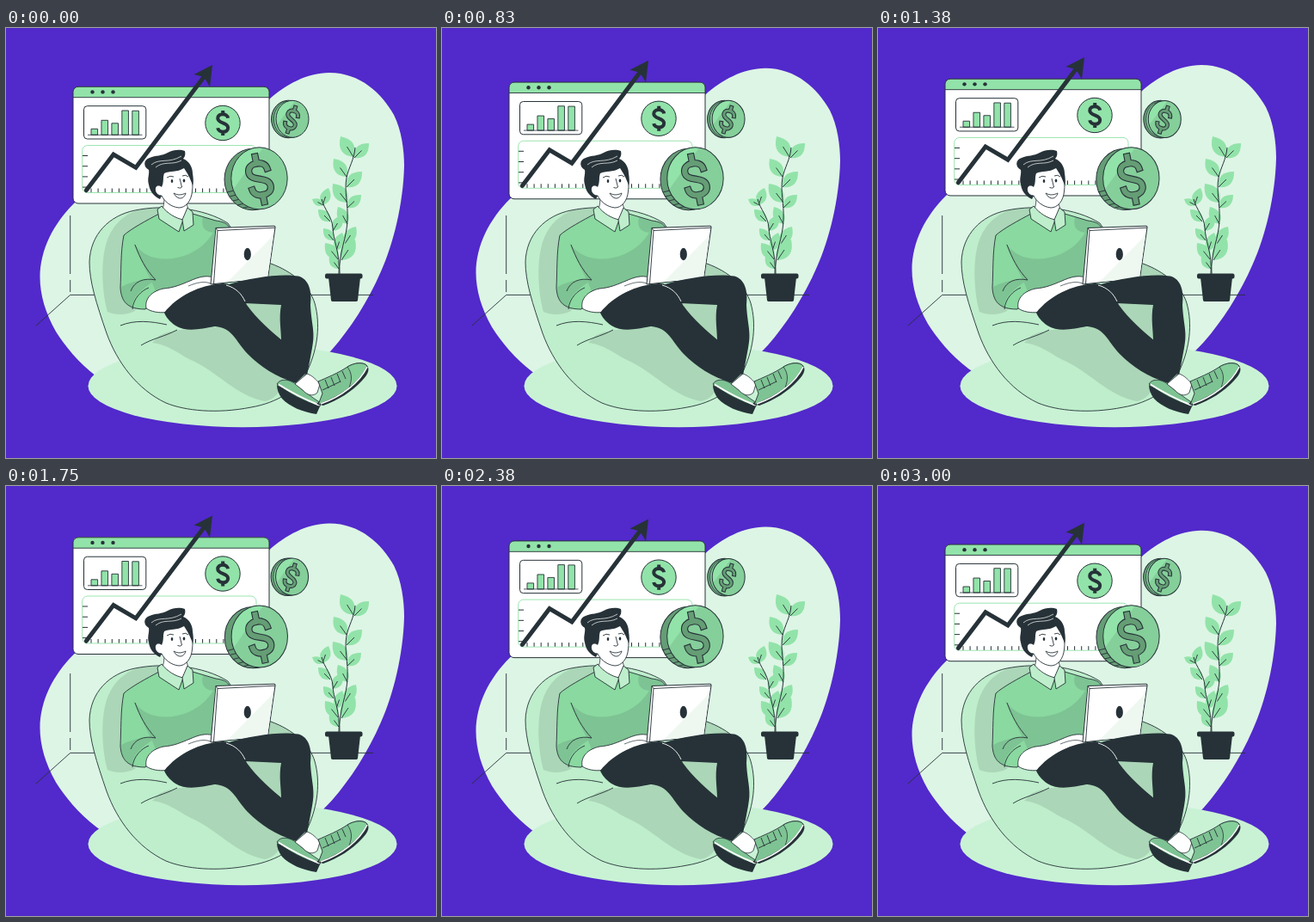
Write an HTML page with a canvas that moves like this. It is 500x500 px and loops after 3.04 s.

```html
<!DOCTYPE html>
<html lang="en">
<head>
<meta charset="utf-8">
<title>Growth chart</title>
<style>
html, body { margin: 0; width: 100%; height: 100%; overflow: hidden; background: #5229cb; }
canvas { display: block; width: 500px; height: 500px; }
</style>
</head>
<body>
<canvas id="stage"></canvas>
<script>
const canvas = document.getElementById('stage');
const ctx = canvas.getContext('2d');
const dpr = window.devicePixelRatio || 1;
canvas.width = canvas.height = 500 * dpr;

const LOOP = 3040, STEPS = 73, LIFT = 10, TILT = Math.PI / 180;
const INK = '#263238', GREEN = '#92e3a9', MID = '#85cf9a', DEEP = '#659d75', DUSK = '#7ec393';
const PALE = '#ddf5e5', RUG = '#c9f2d5', BAG = '#beeecb', SHADE = '#abd6b7', WHITE = '#fff';

function shape(d, fill, stroke, width = 0.9) {
  const p = new Path2D(d);
  if (fill) { ctx.fillStyle = fill; ctx.fill(p); }
  if (stroke) { ctx.strokeStyle = stroke; ctx.lineWidth = width; ctx.stroke(p); }
}
const line = (d, width, color = INK) => shape(d, null, color, width);

function oval(x, y, rx, ry, fill, stroke, width = 1) {
  ctx.beginPath();
  ctx.ellipse(x, y, rx, ry, 0, 0, Math.PI * 2);
  if (fill) { ctx.fillStyle = fill; ctx.fill(); }
  if (stroke) { ctx.strokeStyle = stroke; ctx.lineWidth = width; ctx.stroke(); }
}

function box(x, y, w, h, r, fill, stroke, width = 1) {
  ctx.beginPath();
  ctx.roundRect(x, y, w, h, r);
  if (fill) { ctx.fillStyle = fill; ctx.fill(); }
  if (stroke) { ctx.strokeStyle = stroke; ctx.lineWidth = width; ctx.stroke(); }
}

function lifted(y, draw) {
  ctx.save();
  ctx.translate(0, y);
  draw();
  ctx.restore();
}

function turned(x, y, angle, draw) {
  ctx.save();
  ctx.translate(x, y);
  ctx.rotate(angle);
  ctx.translate(-x, -y);
  draw();
  ctx.restore();
}

const DOLLAR = 'M5.3-5.2C4.6-10.4-5.3-10.6-5.3-4.9C-5.3 .8 5.3-.9 5.3 4.9C5.3 10.6-4.6 10.4-5.3 5.2M0-13V-9M0 9V13';

function dollar(x, y, size, turn, fill, edge = 0) {
  ctx.save();
  ctx.translate(x, y);
  ctx.rotate(turn);
  ctx.scale(size, size);
  if (edge) {
    ctx.lineCap = 'square';
    line(DOLLAR, 3.5 + edge / size);
    line(DOLLAR, 3.5 - edge / size, fill);
  } else line(DOLLAR, 3.6, fill);
  ctx.restore();
}

function blob() {
  shape('M376 52C412 52 437 76 451 101C460 119 463 142 463 160C462 205 450 252 436 283C421 318 400 350 379 374C350 405 320 430 270 432C200 437 130 425 105 405C85 390 68 369 58 353C46 332 39.5 310 39.5 290C39.5 258 55 228 79 204C110 180 200 180 250 130L306 83C325 66 350 52 376 52Z', PALE);
}

function room() {
  line('M74.7 218V286M74.7 293V307M35 346L74.7 310.4H427', 0.9);
  oval(275, 416.2, 179.5, 48, RUG);
}

function chartWindow() {
  box(78, 68.3, 228, 135.7, 6, WHITE);
  box(78, 68.3, 228, 12.4, [6, 6, 0, 0], GREEN);
  line('M78 80.7H306');
  box(78, 68.3, 228, 135.7, 6, null, INK);
  for (let i = 0; i < 3; i++) oval(100.5 + 12 * i, 74.4, 2.2, 2.2, INK);

  box(90.5, 90.7, 72.3, 38.3, 4, WHITE, INK);
  [7, 17, 13.5, 28.3, 28].forEach((h, i) => {
    box(99 + 11.95 * i, 124.3 - h, 7.6, h, 0, GREEN, INK, 0.9);
  });
  line('M95 124.3H158.5', 0.8);

  oval(252, 110.5, 20.2, 20.2, GREEN, INK);
  dollar(252.2, 110.5, 1.12, 0, INK);

  box(88.7, 136.5, 202.3, 55, 6, null, GREEN, 0.9);
  for (let i = 0; i < 4; i++) line(`M89 ${148.5 + 12.2 * i}h6`, 1);
  for (let x = 99; x < 258; x += 8.1) line(`M${x} 186.5v4.6`, 1);

  ctx.lineCap = 'round';
  line('M93.3 188.8L125 147L151 162.3L230 57', 5);
  ctx.lineCap = 'butt';
  shape('M240 43L218.5 54L228 56.5L232 60L237 68.5Z', INK);
}

function face(x, y, rx, ry, band) {
  ctx.save();
  oval(x, y, rx, ry, MID);
  ctx.clip();
  shape(band, GREEN);
  ctx.restore();
  oval(x, y, rx, ry, null, INK, 1);
}

function coins() {
  oval(328.3, 106, 19.8, 21.8, DEEP, INK);
  oval(331, 105.9, 19.6, 21.6, MID, INK, 0.7);
  face(333, 105.8, 19, 21.5, 'M310 82H338L314 114Z');
  dollar(332, 106.5, 1.14, 0.3, DEEP, 1);

  oval(287, 176, 33, 35.7, DEEP, INK);
  line('M257 191L265 189M260 196L268 194M264 201L272 199M269 206L277 204M275 209.5L283 207.5', 0.9);
  face(294.5, 174.8, 32.7, 36, 'M260 135H302L264 188L260 185Z');
  dollar(295, 175.8, 2.06, -0.2, DEEP, 1.1);
}

function leaf(x, y, tx, ty, wide = 0.33) {
  const dx = tx - x, dy = ty - y, nx = -dy * wide, ny = dx * wide;
  const mx = x + dx * 0.45, my = y + dy * 0.45;
  shape(`M${x} ${y}Q${mx + nx * 1.7} ${my + ny * 1.7} ${tx} ${ty}Q${mx - nx * 1.7} ${my - ny * 1.7} ${x} ${y}Z`, GREEN);
  line(`M${x} ${y}L${x + dx * 0.5} ${y + dy * 0.5}`, 0.9);
}

function plant() {
  [[404, 150, 389, 126], [405, 151, 422, 134], [396, 173, 381, 152], [396, 185, 414, 167],
   [397, 203, 380, 181], [397, 209, 413, 194], [397, 228, 386, 208], [394, 251, 407, 231],
   [390, 270, 406, 246],
   [369, 206, 356, 199], [368, 206, 375, 186], [377, 225, 363, 211], [380, 236, 391, 218],
   [381, 247, 369, 233], [384, 259, 391, 238], [386, 269, 371, 250], [387, 280, 376, 265]
  ].forEach(l => leaf(...l));
  line('M388 286C386 262 397 244 397 222C398 205 393 190 396 174C398 163 405 153 406 139', 1);
  line('M387 286C389 263 380 245 380 232C379 219 370 211 367 199', 1);
  shape('M375 290H412L409 316.5Q408.7 318 407 318H380Q378.3 318 378 316.5Z', INK);
  box(371, 285.6, 43.5, 6, 2, INK);
}

function bag() {
  const d = 'M97 272C98 240 120 218 150 212C185 205 230 209 258 227C270 245 285 266 308 274C333 283 353 300 359 320C366 345 362 372 352 395C342 420 315 436 285 441C245 449 208 445 186 436C152 420 129 388 117 355C105 320 97 295 97 272Z';
  ctx.save();
  shape(d, BAG);
  ctx.clip(new Path2D(d));
  shape('M187 206C150 207 128 220 118 246C109 270 112 310 118 330C127 334 140 334 150 329L185 240Z', SHADE);
  shape('M178 358C200 346 235 352 258 345L325 410C318 425 311 432 301 434C266 427 247 400 215 386C196 376 190 369 170 366Z', SHADE);
  shape('M300 268C325 274 343 288 352 304L325 366L270 320Z', SHADE);
  ctx.restore();
  line(d, 0.9);
  line('M133 346C150 339 169 341 187 345M157 369C170 361 184 359 199 351', 0.9);
}

function sweater() {
  const d = 'M178 216C163 224 146 233 137 241C133 260 134 285 133 302C134 319 142 327 162 327L176 306L212 298L250 290L260 233C258 227 252 225 244 224L217 216Z';
  ctx.save();
  shape(d, '#8ad9a0');
  ctx.clip(new Path2D(d));
  shape('M148 249C160 270 188 273 212 263C226 257 236 247 242 236V310H175C172 296 158 276 148 249Z', DUSK);
  shape('M229 220C226 232 232 238 243 238H262V220Z', DUSK);
  shape('M134 301C144 296 158 291 174 293C162 301 146 311 147 326L134 322Z', DUSK);
  ctx.restore();
  line(d, 0.9);
  line('M150 252C156 268 162 280 174 293M145 306C149 295 160 290 174 293M147 327C148 314 158 305 166 302', 0.9);
}

function arm() {
  shape('M163 326C161 314 170 306 183 303C196 302 204 298 214 294C223 290 232 287 241 290V299L210 320C197 332 175 334 163 326Z', WHITE, INK);
  line('M212 300C222 296 230 294 238 297', 0.7);
}

function head() {
  shape('M184 190C184 201 184 207 181 212C188 221 197 223 206 224L212 211L208 198Z', WHITE, INK, 0.8);
  shape('M175 174L181 160L211 158C216 166 218 178 216.5 190C215.5 201 209 209 201 209C191 208 184 201 181 195C174 195 171 188 174 184Z', WHITE, INK, 0.9);
  shape('M166 182C164 175 167 170 166 165C159 161 160 153 167 151C174 148 181 149 188 145C195 141 203 141 208 143C209 147 208 150 206 152C212 154 217 161 217 169C218 175 218 180 217 183C214 174 211 169 207 163C199 168 190 166 184 169C182 174 184 179 181 185C177 182 173 184 174 189C175 193 178 195 181 195L179 199C171 195 167 189 166 182Z', INK);
  line('M169 159C178 151 189 158 204 149M174 162C184 154 193 160 204 154', 0.7, WHITE);
  line('M187 174Q191 171 195 173M205 172Q209 170 212 173M202 175L204.5 185Q203 187 199.5 185.5', 0.9);
  oval(193, 178, 1.3, 2.1, INK);
  oval(207, 177.5, 1.3, 2.1, INK);
  shape('M195 192C200 195 205 194 209 192C207 199 200 201 195 192Z', WHITE, INK, 0.9);
  shape('M181 207L176 211L178 222L201 237L206 223C197 221 188 216 181 207Z', BAG, INK);
  shape('M211 209L217 214L218 229L207 236L205 223Z', BAG, INK);
}

function laptop() {
  shape('M244 232.5L312 230.2Q313.4 230.2 313 232L304.5 291L238 298Z', WHITE, INK, 1);
  shape('M311 241L304 291L258 295Z', '#eef8f1');
  line('M313 232.2L246 235.5L241.5 297.5M244 232.5L246 235.5', 0.9);
  oval(280.8, 263, 4.1, 7.2, INK);
}

function legs() {
  shape('M256 299C285 290 320 285 340 288.5C352 292 356 305 354 322C355 345 360 353 356 372L350 404L332 386L320 364C320 350 317 338 320 322L277 320Z', INK);
  shape('M184 331C200 311 225 299 252 297C267 297 275 309 280 322C293 340 308 352 322 364L349 401L337 413C313 405 296 394 281 379C266 363 264 349 243 347C226 350 210 354 197 346C190 341 186 336 184 331Z', INK);
  line('M256 299C267 302 274 309 278 318', 0.9, WHITE);
}

function shoes() {
  // near shoe: sole, upper, welt
  shape('M315 415C330 424 348 433 365 440L361 449C346 447 329 440 321 431C317 426 315 420 315 415Z', INK);
  shape('M315 414C319 407 330 408 338 415C346 422 355 429 366 436L365 440C347 434 329 425 315 414Z', DUSK, INK, 0.8);
  line('M317 414.5C332 424 348 432 364 438.5', 2, WHITE);
  // ankle
  shape('M336 414L350 402C356 404 361 409 365 414L362 424C357 429 350 427 345 421Z', WHITE, INK, 0.8);
  // far shoe: sole, upper, toe, welt
  shape('M418 391C424 395 422 402 414 410C402 423 386 433 369 439L361 437Z', INK);
  shape('M363 411C372 407 387 401 397 394C405 389 416 388 420 393C413 412 389 428 363 438L368 425Z', DUSK, INK, 0.9);
  shape('M397 394C405 389 416 388 420 393C416 403 408 411 399 418C403 408 402 401 397 394Z', MID, INK, 0.8);
  line('M420 394C411 413 389 429 366 437', 1.6, WHITE);
  line('M371 409L375 419M378 406L382 416M385 402L389 412M391 399L395 408M368 421L389 411', 0.9);
}

// triangle wave: 0, 1, 0, -1 at the quarters of a turn
const wave = p => 1 - Math.abs((p + 0.75) % 1 * 4 - 2);

function frame(now) {
  const p = Math.floor((now % LOOP) / LOOP * STEPS) / STEPS;
  const rise = -LIFT * (1 - Math.abs(2 * p - 1));
  const tilt = TILT * -wave(p * 2 + 0.5);

  ctx.setTransform(dpr, 0, 0, dpr, 0, 0);
  ctx.lineJoin = 'miter';
  ctx.fillStyle = '#5229cb';
  ctx.fillRect(0, 0, 500, 500);
  lifted(rise, blob);
  room();
  lifted(rise, chartWindow);
  turned(303, 148, tilt, coins);
  ctx.lineJoin = 'round';
  plant();
  bag();
  sweater();
  head();
  arm();
  laptop();
  legs();
  shoes();
  requestAnimationFrame(tick);
}

const start = performance.now();
const tick = () => frame(performance.now() - start);
tick();
</script>
</body>
</html>
```
